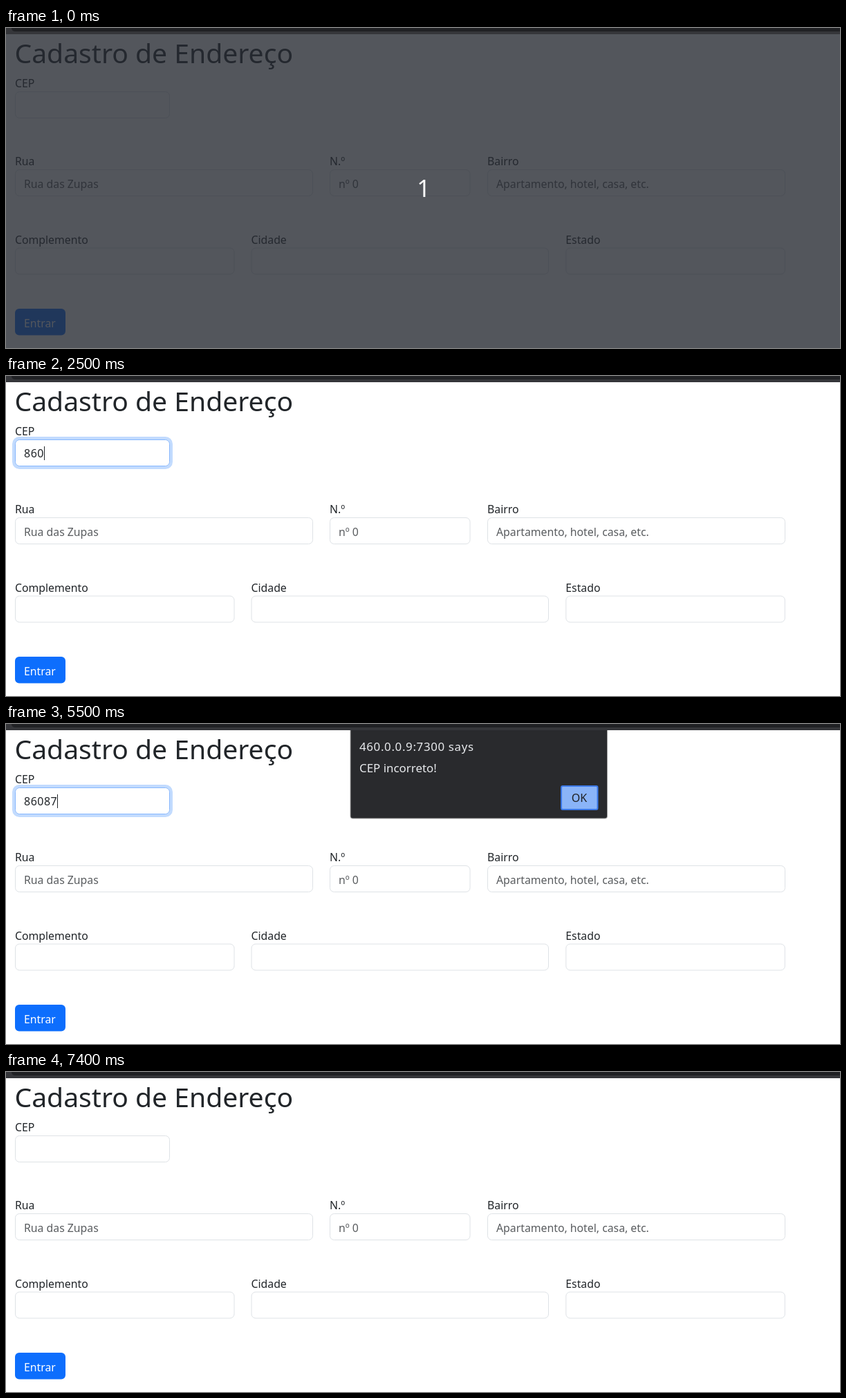
Write an HTML page that moves like this. It is 1206 px wide and 464 px high and loops after 8 s.

```html
<!DOCTYPE html>
<html lang="pt-BR">
<head>
<meta charset="utf-8">
<title>Cadastro de Endereço</title>
<style>
  html, body { margin: 0; width: 100%; height: 100%; overflow: hidden; background: #fff; }
  svg { display: block; width: 1206px; height: 464px; font: 15.8px "Noto Sans", sans-serif; fill: #212529; }
  .title { font-size: 39.1px; }
  .hint { fill: #595c5f; }
  .value { font-size: 16px; letter-spacing: .5px; }
  .field { fill: #fff; stroke: #dee2e6; }
  .glow { fill: none; stroke: #c2dbfe; stroke-width: 4; }
  .focus { fill: #fff; stroke: #86b7fe; }
  .dialog text { font-size: 16.9px; fill: #e8eaed; }
  .dialog .host { letter-spacing: .65px; }
  .dialog .ok { font-size: 16px; fill: #202124; text-anchor: middle; }
</style>
</head>
<body>
<svg viewBox="0 0 1206 464">
  <text class="title" x="12.5" y="50.5">Cadastro de Endereço</text>
  <g id="form"></g>
  <rect x="13" y="407" width="73" height="38.5" rx="6" fill="#0d6efd"/>
  <text x="26" y="433.5" fill="#fff">Entrar</text>
  <text id="cep" class="value" x="26" y="118"></text>
  <rect id="caret" width="1" height="20"/>

  <g id="dialog" class="dialog">
    <path id="shadow" fill="none" stroke="#000" stroke-opacity=".35" stroke-width="2"/>
    <path id="panel" fill="#292a2d"/>
    <text class="host" x="511" y="38.5">460.0.0.9:7300 says</text>
    <text x="511" y="70">CEP incorreto!</text>
    <rect x="803" y="90" width="52.5" height="34" rx="2" fill="#8ab4f8" stroke="#3b78e7" stroke-width="2"/>
    <text class="ok" x="829" y="112.5">OK</text>
  </g>

  <g id="countdown">
    <rect y="8" width="1206" height="456" fill="rgb(37,41,49)" fill-opacity=".79"/>
    <text x="604" y="245" font-size="34" fill="#fff" text-anchor="middle">1</text>
  </g>

  <rect width="1206" height="9" fill="#35363a"/>
  <path d="M8 0Q8 5 14 5H1206V0Z" fill="#202124"/>
</svg>
<script>
const $ = id => document.getElementById(id);
const LOOP = 8000;

// label, x, y, width, placeholder
const fields = [
  ['CEP', 13.5, 92.5, 223, ''],
  ['Rua', 13.5, 205.5, 430, 'Rua das Zupas'],
  ['N.º', 468.5, 205.5, 202.5, 'nº 0'],
  ['Bairro', 696.5, 205.5, 430, 'Apartamento, hotel, casa, etc.'],
  ['Complemento', 13.5, 319, 316.5, ''],
  ['Cidade', 355, 319, 429.5, ''],
  ['Estado', 809.8, 319, 316.5, '']
];

$('form').innerHTML = fields.map(([label, x, y, w, hint], i) => `
  <text x="${x - .5}" y="${y - 6.5}">${label}</text>
  <rect class="field" x="${x}" y="${y}" width="${w}" height="38" rx="6"/>
  <g id="focus${i}">
    <rect class="glow" x="${x - 2.5}" y="${y - 2.5}" width="${w + 5}" height="43" rx="8.5"/>
    <rect class="focus" x="${x}" y="${y}" width="${w}" height="38" rx="6"/>
  </g>
  <text class="hint" x="${x + 12.5}" y="${y + 26}">${hint}</text>`).join('');

const keyTimes = [1900, 2100, 2500, 3200, 3500];
const caretOff = [[1000, 1600], [3100, 3200], [6500, 7200]];
const within = (t, a, b) => t >= a && t < b;
const show = (id, opacity) => $(id).setAttribute('opacity', opacity);

// Two-step fade in from start and fade out from end
function focusLevel(t, start, end, fadeOut) {
  if (t < start || t >= end + fadeOut) return 0;
  return t < start + 100 || t >= end ? .5 : 1;
}

function dialogLevel(t) {
  if (within(t, 4200, 4300)) return .71;
  if (within(t, 4300, 5600)) return 1;
  if (within(t, 5600, 5700)) return .6;
  return within(t, 5700, 5800) ? .15 : 0;
}

function drawDialog(t) {
  const level = dialogLevel(t);
  const tilt = (1 - level) * 5;
  const left = 498.5 - tilt, right = 869 + tilt;
  const shape = `M498.5 0L${left} 133.5q0 3 3 3H${right - 3}q3 0 3 -3L869 0Z`;
  $('panel').setAttribute('d', shape);
  $('shadow').setAttribute('d', shape);
  $('dialog').setAttribute('transform', `translate(0 ${-tilt * 4.1})`);
  show('dialog', level);
}

function render(t) {
  const typed = t < 7400 ? keyTimes.filter(k => t >= k).length : 0;
  $('cep').textContent = '86087'.slice(0, typed);

  const onStreet = t >= 6000;
  const caretOn = within(t, 500, 7400) && !caretOff.some(([a, b]) => within(t, a, b));
  $('caret').setAttribute('x', onStreet ? 26 : Math.round(26 + 9.65 * typed));
  $('caret').setAttribute('y', onStreet ? 215 : 102);
  show('caret', +caretOn);

  fields.forEach((_, i) => show('focus' + i, 0));
  show('focus0', focusLevel(t, 500, 6000, 100));
  show('focus1', focusLevel(t, 6000, 7400, 0));

  drawDialog(t);
  show('countdown', +(t < 100));
}

const start = performance.now();
function frame() {
  render((performance.now() - start) % LOOP);
  requestAnimationFrame(frame);
}
frame();
</script>
</body>
</html>
```
